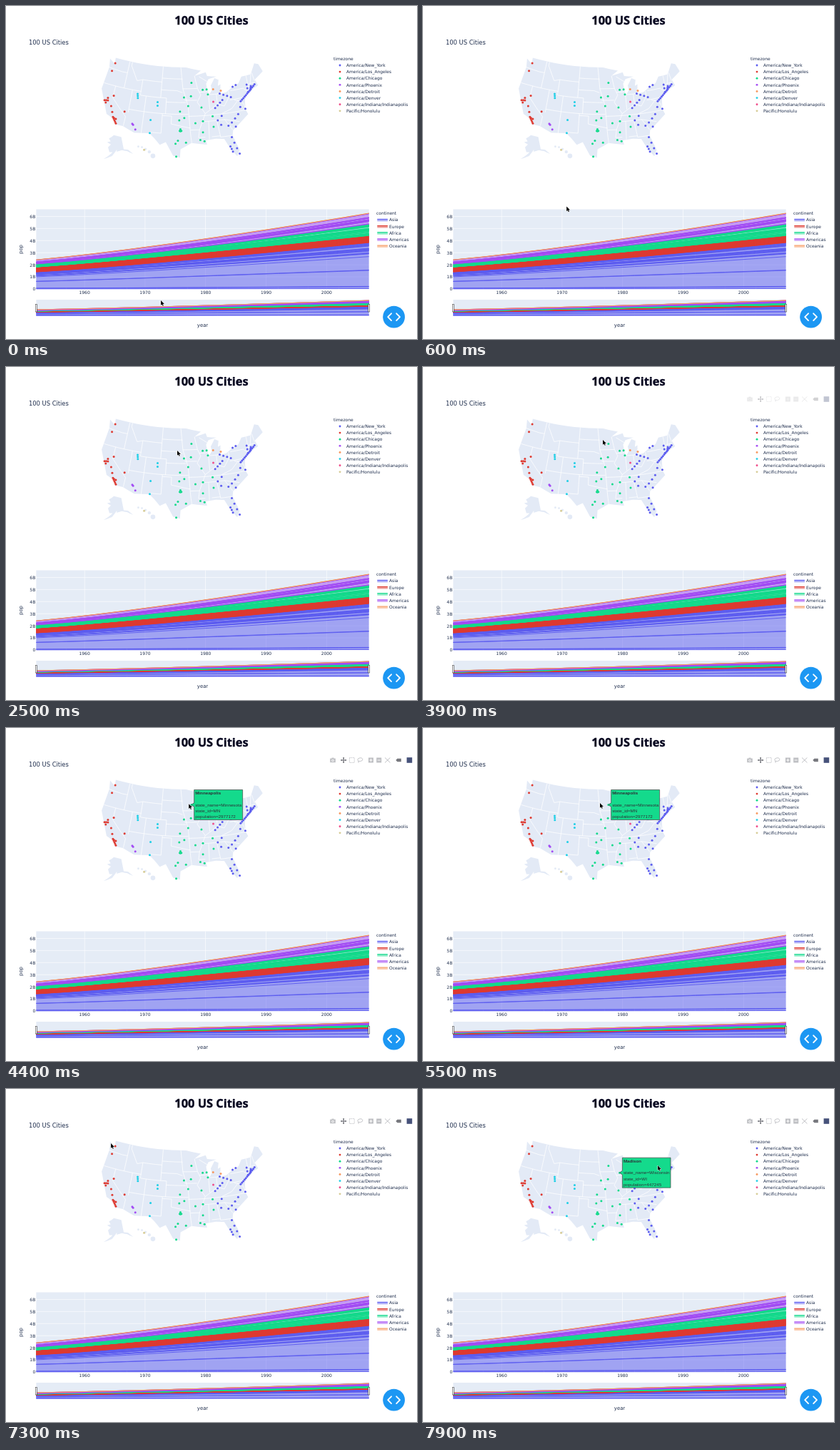
Recreate the animation shown at these times as an HTML page with a canvas. Size 576 by 466 pixels, loop 8 s.

```html
<!DOCTYPE html>
<html lang="en">
<head>
<meta charset="utf-8">
<title>100 US Cities</title>
<style>
html, body { margin: 0; width: 100%; height: 100%; overflow: hidden; background: #fff; }
canvas { display: block; width: 576px; height: 466px; }
</style>
</head>
<body>
<canvas id="stage"></canvas>
<script>
const W = 576, H = 466, LOOP = 8000, STEP = 100;
const INK = '#1f2e4d', LAND = '#e3eaf6';
const BLUE = '#5c5cf0', RED = '#de3a31', GREEN = '#14da8c', PURPLE = '#a34cf4', ORANGE = '#f79a62';
const SANS = '"DejaVu Sans", Verdana, sans-serif';
const HEAD = '"Open Sans", "Noto Sans", sans-serif';
const ARIAL = '"Liberation Sans", Arial, sans-serif';
const dpr = window.devicePixelRatio || 1;

function layer(canvas) {
  canvas.width = W * dpr;
  canvas.height = H * dpr;
  const c = canvas.getContext('2d');
  c.scale(dpr, dpr);
  return c;
}
const stage = layer(document.getElementById('stage'));
const still = document.createElement('canvas');
let g = layer(still);

// y is the middle of the capitals
function text(s, x, y, size, align = 'left', color = INK, font = SANS, weight = '') {
  g.font = `${weight} ${size}px ${font}`;
  g.textAlign = align;
  g.fillStyle = color;
  g.fillText(s, x, y + size * 0.36);
}
function dot(x, y, r, color) {
  g.fillStyle = color;
  g.beginPath();
  g.arc(x, y, r, 0, Math.PI * 2);
  g.fill();
}
function trace(points) {
  g.beginPath();
  points.forEach(([x, y]) => g.lineTo(x, y));
}
function shape(points, color) {
  trace(points);
  g.closePath();
  g.fillStyle = color;
  g.fill();
}
function line(points, color, width) {
  trace(points);
  g.strokeStyle = color;
  g.lineWidth = width;
  g.stroke();
}
function box(x, y, w, h, color) {
  g.fillStyle = color;
  g.fillRect(x, y, w, h);
}
const mix = (a, b, f) => a + (b - a) * f;
const clamp = f => Math.max(0, Math.min(1, f));

// ---- map: Albers equal-area conics, longitudes counted west ----
const RAD = Math.PI / 180;
function conic(lon0, p1, p2, scale, lonC, latC, px, py) {
  const s1 = Math.sin(p1 * RAD), n = (s1 + Math.sin(p2 * RAD)) / 2;
  const c = 1 - s1 * s1 + 2 * n * s1;
  const raw = (lon, lat) => {
    const r = Math.sqrt(c - 2 * n * Math.sin(lat * RAD)) / n, a = n * (lon0 - lon) * RAD;
    return [r * Math.sin(a), r * Math.cos(a)];
  };
  const [x0, y0] = raw(lonC, latC);
  return (lon, lat) => {
    const [x, y] = raw(lon, lat);
    return [px + (x - x0) * scale, py + (y - y0) * scale];
  };
}
const K = 313, MX = 246.9, MY = 142.3;
const mainland = conic(96, 29.5, 45.5, K, 96.6, 38.7, MX, MY);
const alaska = conic(154, 55, 65, K * 0.35, 156, 58.5, MX - 0.307 * K, MY + 0.201 * K);
const hawaii = conic(157, 8, 18, K, 160, 19.9, MX - 0.205 * K, MY + 0.212 * K);
const project = (lon, lat) => (lat < 24 ? hawaii : mainland)(lon, lat);

// flat lon/lat list to pixels, long edges bent along the parallels
function path(list, proj) {
  const out = [proj(list[0], list[1])];
  for (let i = 2; i < list.length; i += 2) {
    const [ax, ay, bx, by] = list.slice(i - 2, i + 2);
    const n = Math.ceil(Math.abs(bx - ax) / 3) || 1;
    for (let k = 1; k <= n; k++) out.push(proj(mix(ax, bx, k / n), mix(ay, by, k / n)));
  }
  return out;
}

const northCoast = [124.7, 48.4, 122.4, 47.4, 122.7, 49, 95.2, 49, 93, 48.6, 89.6, 48, 92.1, 46.75, 87.8, 47.5,
  87.4, 46.5, 84, 46.1, 87, 45.7, 88, 44.6, 87.8, 43, 87.3, 41.6, 86.2, 42.8, 86.4, 44, 84.8, 45.75, 83.4, 45.2,
  83.9, 43.7, 82.9, 44, 83.4, 41.7, 81.3, 41.8, 79, 42.8, 76.5, 43.5, 75, 45, 71.5, 45, 69.2, 47.45, 67.8, 47,
  67, 44.9, 70.6, 43.4];
const southCoast = [70, 41.8, 73.7, 40.95, 72, 41.05, 74, 40.6, 75.5, 39.2, 75.9, 37.2, 76.3, 38.9, 76.1, 36.9,
  75.5, 35.3, 77.9, 33.9, 81, 32, 81.4, 30.7, 80.05, 26.8, 81, 25.2, 82.8, 27.8, 84, 30.1, 86.5, 30.4, 89.5, 30.2,
  89.2, 29.1, 93.8, 29.7, 97, 28.1, 97.15, 25.95, 99.1, 26.4, 101.4, 29.8, 103.1, 29, 104.9, 30.6, 106.5, 31.75,
  111.1, 31.35, 114.8, 32.5, 117.1, 32.5, 118.4, 33.9, 120.6, 34.55, 122.5, 37.6, 124.4, 40.4, 124, 46.2];
const arctic = [141, 69.6, 141, 60.3, 135, 59.4, 130, 55.2, 137, 58.5, 144, 60, 151.8, 59.2, 151, 61, 158, 56,
  168, 53, 157.5, 58.7, 162, 58.7, 165, 62, 161, 64.3, 168, 65.6, 162, 66.5, 166, 68.5, 156.6, 71.3];

const bordersWest = [
  [124, 46.2, 119, 45.95, 117, 46], [117, 49, 117, 42], [124.2, 42, 111, 42], [120, 42, 120, 39, 114.6, 35, 114.7, 32.6],
  [114, 42, 114, 36.2], [114, 37, 94.6, 37], [109, 41, 109, 31.3], [111, 45, 111, 41, 102, 41, 102, 37],
  [116, 49, 116, 48, 113, 44.5, 111, 45, 104, 45], [104, 49, 104, 41], [104, 46, 96.5, 46],
  [104, 43, 98.5, 43, 96.5, 42.5], [102, 40, 95.3, 40], [103, 37, 103, 32, 106.6, 32],
  [103, 36.5, 100, 36.5, 100, 34.5, 94, 33.5], [97.2, 49, 96.4, 43.5, 94.6, 39.1, 94, 32, 93.7, 29.7]];
const bordersEast = [
  [92.1, 46.75, 91.2, 43.5, 90.2, 41.8, 91.5, 40, 89.1, 37, 91.2, 33, 91.6, 31, 89.6, 31], [96.4, 43.5, 91.2, 43.5],
  [95.8, 40.6, 91.5, 40.5], [90.6, 42.5, 87.8, 42.5], [94.6, 36.5, 75.9, 36.5], [94, 33, 91.2, 33],
  [90.4, 46.5, 87.6, 45.1], [87.5, 41.7, 87.5, 38], [89.1, 37, 84.8, 39.1, 82.6, 38.4, 80.5, 40.6, 80.5, 42],
  [84.8, 39.1, 84.8, 41.7], [87, 41.7, 83.4, 41.7], [79.8, 42, 75.3, 42, 74, 41], [80.5, 39.7, 75.5, 39.7],
  [79, 39.5, 77, 39, 76.3, 38], [77.8, 39.3, 80.3, 37.5, 83.7, 36.6], [90.2, 35, 83.1, 35, 78.6, 33.9],
  [83.1, 35, 81.1, 32.1], [85.6, 35, 85, 30.7, 81.5, 30.7], [88.2, 35, 88.4, 30.4], [85, 31, 87.6, 31],
  [73.3, 45, 73.5, 41], [71.5, 45, 72.5, 42.7], [73.3, 42.7, 70.8, 42.8], [73.5, 42, 71.3, 41.8], [71, 45.3, 70.8, 43.1]];

// each run: lon, lat of both ends and how many cities lie along it
const zones = [
  ['America/New_York', BLUE, [[77, 38.9, 71.1, 42.3, 12], [73.9, 40.8, 73.8, 42.7, 3], [78.8, 42.9, 77.6, 43.2, 2],
    [83.6, 41.7, 80, 40.4, 4], [85.7, 38.2, 83, 40, 4], [85.3, 35, 83.9, 36, 2], [84.4, 33.8, 80, 32.8, 3],
    [81, 34, 78.6, 35.8, 3], [77.5, 37.5, 76, 36.8, 2], [81.7, 30.3, 80.2, 25.8, 4], [82.5, 28, 82, 26.6, 3],
    [72.9, 41.3, 72.5, 42.1, 3]]],
  ['America/Los_Angeles', RED, [[122.3, 47.6, 122.7, 45.5, 2], [119.8, 39.5, 121.5, 38.6, 2], [122.4, 37.8, 121.3, 38, 3],
    [121.8, 37.3, 119.8, 36.8, 2], [119, 35.4, 115.2, 36.2, 2], [118.4, 34.2, 117.1, 32.8, 5], [118, 34, 117.4, 33.9, 2]]],
  ['America/Chicago', GREEN, [[93.3, 45, 93.6, 41.6, 2], [89.4, 43.1, 88, 43.1, 2], [87.7, 41.8, 90.2, 38.6, 2],
    [96, 41.3, 94.6, 39.1, 2], [97.3, 37.7, 97.5, 35.5, 2], [95.9, 36.1, 92.4, 34.7, 2], [90, 35.1, 86.8, 36.2, 2],
    [86.8, 33.5, 90.2, 32.3, 2], [91.1, 30.4, 89.9, 30, 2], [97.3, 32.8, 96.8, 32.8, 2], [97.1, 33.2, 97.1, 32.7, 2],
    [95.4, 29.8, 97.8, 30.3, 2], [98.5, 29.5, 98.2, 26.2, 2]]],
  ['America/Phoenix', PURPLE, [[112.1, 33.5, 111.8, 33.3, 2], [110.9, 32.2, 110.9, 32.2, 1]]],
  ['America/Detroit', ORANGE, [[83.1, 42.4, 85.7, 43, 2]]],
  ['America/Denver', '#1fcfe6', [[104.9, 39.8, 104.8, 38.9, 2], [112, 41.2, 111.7, 40.2, 3], [106.6, 35.1, 106.4, 31.8, 2]]],
  ['America/Indiana/Indianapolis', '#f0508c', [[86.1, 39.8, 86.1, 39.8, 1]]],
  ['Pacific/Honolulu', '#d6cc96', [[157.9, 21.3, 157.9, 21.3, 1]]]
];

function drawMap() {
  g.lineJoin = 'round';
  shape(path([...northCoast, ...southCoast], mainland), LAND);
  shape(path(arctic, alaska), LAND);
  for (let i = 0; i < 5; i++)
    dot(...hawaii(159.5 - i, 22.1 - 0.15 * i * i), 1.4 + 0.03 * i ** 3, LAND);
  for (const b of [...bordersWest, ...bordersEast]) line(path(b, mainland), '#fff', 0.75);

  text('timezone', 459, 73.6, 5.95);
  zones.forEach(([name, color, runs], i) => {
    for (const [ax, ay, bx, by, n] of runs)
      for (let k = 0; k < n; k++) {
        const f = k / Math.max(1, n - 1);
        dot(...project(mix(ax, bx, f), mix(ay, by, f)), 1.5, color);
      }
    const y = 83 + i * 9.12;
    dot(468, y, 1.45, color);
    text(name, 477, y, 5.95);
  });
}

// ---- stacked population ----
// millions in 1952 and 2007, growth exponent, countries, first/last share of the large ones
const continents = [
  ['Asia', BLUE, 1395, 3812, 1.134, 29,
    { 1: [0.034, 0.04], 3: [0.4, 0.346], 5: [0.267, 0.291], 6: [0.059, 0.059], 10: [0.062, 0.033], 19: [0.03, 0.044] }],
  ['Europe', RED, 418, 586, 0.67, 30, {}],
  ['Africa', GREEN, 238, 930, 1.606, 52, { 14: [0.09, 0.086], 17: [0.088, 0.082], 36: [0.139, 0.145] }],
  ['Americas', PURPLE, 345, 899, 1.098, 25,
    { 0: [0.052, 0.045], 2: [0.165, 0.211], 5: [0.035, 0.049], 15: [0.087, 0.121], 22: [0.457, 0.335] }],
  ['Oceania', ORANGE, 11, 24.5, 1, 2, { 0: [0.81, 0.83] }]
];
const WAVES = Array.from({ length: 12 }, (_, i) => i / 11);
const X0 = 42.3, X1 = 508.6, yearX = y => X0 + (y - 1952) * 8.478;

// country shares at f: the large ones as given, the others even
function shares(n, large, f) {
  const big = Object.values(large).map(([a, b]) => mix(a, b, f));
  const rest = (1 - big.reduce((s, v) => s + v, 0)) / (n - big.length);
  return Array.from({ length: n }, (_, i) => large[i] ? mix(...large[i], f) : rest);
}
function stack(base, perBillion) {
  const place = vals => vals.map((v, i) => [mix(X0, X1, WAVES[i]), base - v / 1000 * perBillion]);
  let low = WAVES.map(() => 0);
  for (const [, color, first, last, power, n, large] of continents) {
    const parts = WAVES.map(f => shares(n, large, f).map(s => s * mix(first, last, f ** power)));
    for (let c = 0; c < n; c++) {
      const high = low.map((v, i) => v + parts[i][c]);
      g.globalAlpha = 0.5;
      shape([...place(high), ...place(low).reverse()], color);
      g.globalAlpha = 1;
      line(place(high), color, 0.96);
      low = high;
    }
  }
}

function drawChart() {
  const base = 396, unit = 16.95, top = 284.5;
  box(X0, top, X1 - X0, base - top, '#e5ecf6');
  for (let y = 1960; y <= 2000; y += 10) {
    box(yearX(y) - 0.3, top, 0.6, base - top, '#fff');
    text(y, yearX(y), 400.4, 5.95, 'center');
  }
  for (let b = 0; b <= 6; b++) {
    box(X0, base - b * unit - 0.3, X1 - X0, 0.6, '#fff');
    text(b ? b + 'B' : '0', 41.2, base - b * unit + 0.3, 5.95, 'right');
  }
  stack(base, unit);

  box(X0, 411, X1 - X0, 22, '#e5ecf6');
  stack(433, 3.35);
  for (const x of [X0, X1]) {
    box(x - 1.3, 417, 2.6, 11.2, '#444');
    box(x - 0.7, 417.6, 1.4, 10, '#fff');
  }

  text('year', 275.5, 446.3, 6.9, 'center');
  g.save();
  g.translate(20.5, 340.5);
  g.rotate(-Math.PI / 2);
  text('pop', 0, 0, 6.9, 'center');
  g.restore();

  text('continent', 519, 290, 5.95);
  continents.forEach(([name, color], i) => {
    const y = 299.2 + i * 9.18;
    g.globalAlpha = 0.5;
    box(520.3, y - 0.7, 14.6, 2.8, color);
    g.globalAlpha = 1;
    box(520.3, y - 1.4, 14.6, 1.1, color);
    text(name, 537, y, 5.95);
  });
}

function drawTitles() {
  text('100 US Cities', 288, 20, 16.4, 'center', '#06061f', HEAD, 'bold');
  g.strokeStyle = '#06061f';
  g.lineWidth = 0.35;
  g.strokeText('100 US Cities', 288, 20 + 16.4 * 0.36);
  text('100 US Cities', 32, 50.8, 8.35);
}

function drawButton() {
  const x = 543.6, y = 435.2;
  dot(x, y, 15.4, '#1c97f3');
  g.lineCap = 'round';
  for (const s of [-1, 1])
    line([[x + s * 3.6, y - 4.9], [x + s * 8.4, y], [x + s * 3.6, y + 4.9]], '#fff', 1.9);
  g.lineCap = 'butt';
}

function drawBar(alpha) {
  if (!alpha) return;
  const pale = '#bfc0c4', dark = '#77787e', y = 45;
  g.globalAlpha = alpha;
  // camera
  box(454.2, y - 2.4, 7.6, 5.6, pale);
  box(456.4, y - 3.4, 3.2, 1.2, pale);
  dot(458, y + 0.4, 1.7, '#fff');
  dot(458, y + 0.4, 0.9, pale);
  // pan
  line([[469.6, y], [476.6, y]], dark, 1.2);
  line([[473.1, y - 3.5], [473.1, y + 3.5]], dark, 1.2);
  for (const s of [-3, 3]) {
    dot(473.1 + s, y, 1, dark);
    dot(473.1, y + s, 1, dark);
  }
  // select and lasso
  g.strokeStyle = pale;
  g.lineWidth = 0.9;
  g.setLineDash([1.4, 0.9]);
  g.strokeRect(481.4, y - 3.4, 6.8, 6.8);
  g.setLineDash([]);
  g.beginPath();
  g.ellipse(496.3, y - 0.8, 3.5, 2.4, -0.2, 0, Math.PI * 2);
  g.stroke();
  line([[494, y + 1], [493.6, y + 2.6], [495, y + 3.6]], pale, 0.9);
  // zoom in and out
  for (const x of [511.4, 522.7]) {
    box(x - 3.5, y - 3.5, 7, 7, pale);
    box(x - 2.1, y - 0.5, 4.2, 1, '#fff');
  }
  box(510.9, y - 2.1, 1, 4.2, '#fff');
  // reset
  for (const s of [-1, 1]) line([[531, y - 3.5 * s], [538.4, y + 3.5 * s]], pale, 1);
  // hover tag
  shape([[546.3, y], [548.4, y - 2.2], [553.8, y - 2.2], [553.8, y + 2.2], [548.4, y + 2.2]], dark);
  box(561.6, y - 3.8, 7.6, 7.6, '#46527a');
  g.globalAlpha = 1;
}

const tips = [
  { from: 4400, to: 5600, at: [93.3, 45], color: GREEN, city: 'Minneapolis', state: 'Minnesota', id: 'MN', pop: 2977172 },
  { from: 6100, to: 7200, at: [122.3, 47.6], color: RED, city: 'Seattle', state: 'Washington', id: 'WA', pop: 3789215 },
  { from: 7800, to: LOOP, at: [89.4, 43.1], color: GREEN, city: 'Madison', state: 'Wisconsin', id: 'WI', pop: 447245 }
];
function drawTip({ at, color, city, state, id, pop }) {
  const rows = [city, '', 'state_name=' + state, 'state_id=' + id, 'population=' + pop];
  const [x, y] = project(...at), size = 6.24, left = x + 3.8, half = 21;
  g.font = `${size}px ${ARIAL}`;
  const right = left + 3 + Math.max(...rows.map(r => g.measureText(r).width));
  shape([[x, y], [left, y - 2.9], [left, y - half], [right, y - half],
    [right, y + half], [left, y + half], [left, y + 2.9]], color);
  g.strokeStyle = '#444';
  g.lineWidth = 0.7;
  g.stroke();
  rows.forEach((r, i) => text(r, left + 1.5, y + (i - 2) * 8.15, size, 'left', '#2c3338', ARIAL, i ? '' : 'bold'));
}

// pointer stops: arrive at `from`, leave at `to`
const stops = [
  { from: 0, to: 0, x: 217, y: 412 }, { from: 1100, to: 1100, x: 188, y: 171 }, { from: 2500, to: 2900, x: 240, y: 117 },
  { from: 3700, to: 3900, x: 252, y: 102 }, { from: 4500, to: 5200, x: 257, y: 107 }, { from: 5500, to: 5500, x: 248, y: 105 },
  { from: 6200, to: 7300, x: 147, y: 76 }, { from: 7800, to: 7800, x: 278, y: 113 }, { from: 7900, to: LOOP, x: 329, y: 107 }];

function drawPointer(t) {
  const i = stops.findIndex((s, k) => k && t <= s.to), a = stops[i - 1], b = stops[i];
  const f = clamp((t - a.to) / (b.from - a.to)), x = mix(a.x, b.x, f), y = mix(a.y, b.y, f);
  const arrow = [[0, 0], [0, 6.8], [1.6, 5.4], [2.7, 7.8], [3.8, 7.3], [2.7, 4.9], [4.9, 4.9]].map(p => [x + p[0], y + p[1]]);
  line([...arrow, arrow[0]], '#fff', 1);
  shape(arrow, '#000');
}

box(0, 0, W, H, '#fff');
drawTitles();
drawMap();
drawChart();
drawButton();
g = stage;

let last = -1;
function frame(now) {
  const t = Math.floor(now % LOOP / STEP) * STEP;
  if (t !== last) {
    last = t;
    g.drawImage(still, 0, 0, W, H);
    drawBar(clamp((t - 3800) / 300));
    tips.filter(p => t >= p.from && t < p.to).forEach(drawTip);
    drawPointer(t);
  }
  requestAnimationFrame(frame);
}
frame(0);
</script>
</body>
</html>
```
